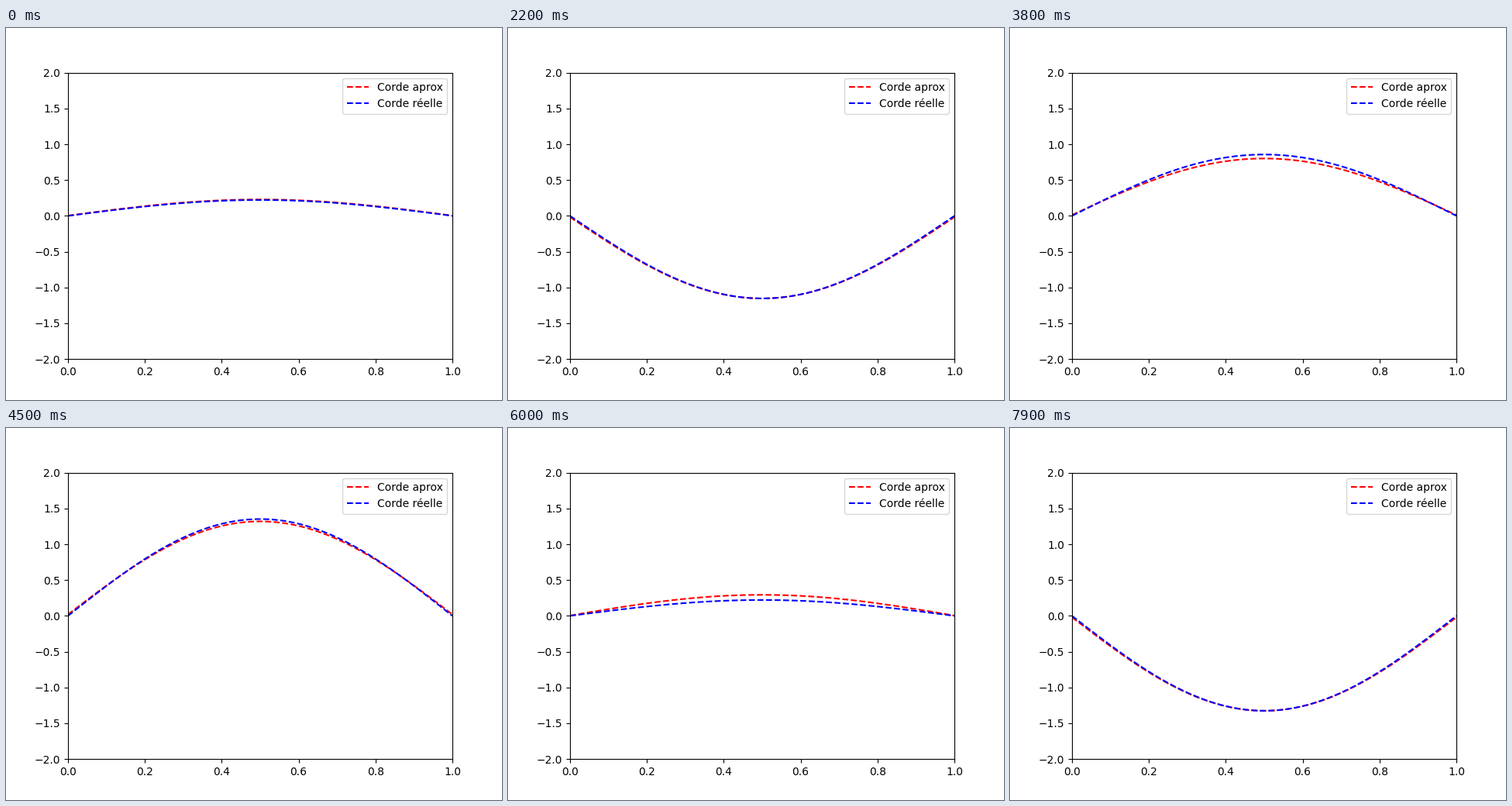
These frames come from a looping animation (640x480 px, 8 s). A matplotlib script:

```python
import numpy as np
import matplotlib.pyplot as plt
from matplotlib.animation import FuncAnimation

FRAMES, STEP = 80, 100  # ms per step

x = np.linspace(0, 1, 101)

# The approximate string has slightly soft ends, so its mode is wider and slower.
real_shape = np.sin(np.pi * x)
approx_shape = np.cos(3.1115 * (x - 0.5))


def real(t):
    return -1.37 * np.cos(np.pi / 3 * (t - 1.655)) * real_shape


def approx(t):
    return -1.348 * np.cos(1.039 * t - 1.741) * approx_shape


fig, ax = plt.subplots(figsize=(6.4, 4.8), dpi=100)
ax.set_xlim(0, 1)
ax.set_ylim(-2, 2)
red, = ax.plot(x, approx(0), "r--", label="Corde aprox")
blue, = ax.plot(x, real(0), "b--", label="Corde réelle")
ax.legend(loc="upper right")


def update(i):
    t = i * STEP / 1000
    red.set_ydata(approx(t))
    blue.set_ydata(real(t))
    return red, blue


anim = FuncAnimation(fig, update, frames=FRAMES, interval=STEP,
                     repeat=True, repeat_delay=0, blit=False)
plt.show()
```
